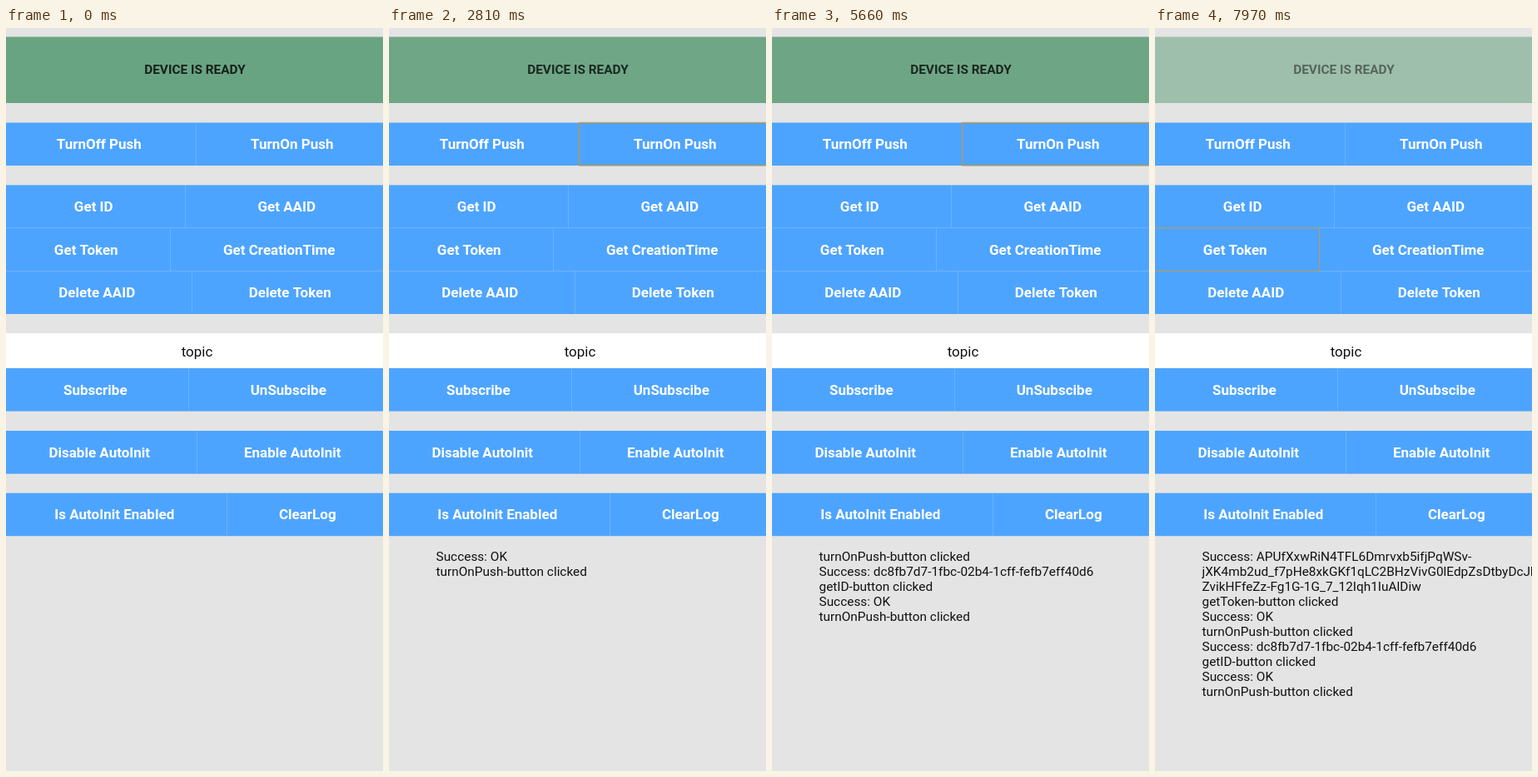
Write an HTML page with a canvas that moves like this. It is 453x891 px and loops after 8000 ms.

```html
<!DOCTYPE html>
<html lang="en">
<head>
<meta charset="utf-8">
<title>Push demo</title>
<style>
  html, body { margin: 0; width: 100%; height: 100%; overflow: hidden; background: #e4e4e4; }
  canvas { display: block; width: 453px; height: 891px; }
</style>
</head>
<body>
<canvas id="stage"></canvas>
<script>
const W = 453, H = 891, LOOP = 8000;
const LEFT = -5, RIGHT = 459;
const canvas = document.getElementById('stage');
const ctx = canvas.getContext('2d');
const ratio = window.devicePixelRatio || 1;
canvas.width = W * ratio;
canvas.height = H * ratio;
ctx.scale(ratio, ratio);

// Button rows: top, bottom, divider x, left label, right label
const rows = [
  [113.5, 165, 228.5, 'TurnOff Push', 'TurnOn Push'],
  [188.4, 240, 215.5, 'Get ID', 'Get AAID'],
  [240, 291.5, 197.5, 'Get Token', 'Get CreationTime'],
  [291.5, 343, 223.5, 'Delete AAID', 'Delete Token'],
  [408, 459.6, 219.5, 'Subscribe', 'UnSubscibe'],
  [483, 534.6, 229.5, 'Disable AutoInit', 'Enable AutoInit'],
  [557.7, 609.2, 265.5, 'Is AutoInit Enabled', 'ClearLog']
];

// Newest lines are shown on top
const log = [
  [850, 'turnOnPush-button clicked'],
  [2000, 'Success: OK'],
  [3600, 'getID-button clicked'],
  [3700, 'Success: dc8fb7d7-1fbc-02b4-1cff-fefb7eff40d6'],
  [5030, 'turnOnPush-button clicked'],
  [5950, 'Success: OK'],
  [6290, 'getToken-button clicked'],
  [7200, 'Success: APUfXxwRiN4TFL6Dmrvxb5ifjPqWSv-',
    'jXK4mb2ud_f7pHe8xkGKf1qLC2BHzVivG0lEdpZsDtbyDcJh',
    'ZvikHFfeZz-Fg1G-1G_7_12Iqh1IuAlDiw']
];

// Focus changes: time, row, side (0 left, 1 right)
const focus = [[800, 0, 1], [3560, 1, 0], [5030, 0, 1], [6230, 2, 0]];

const bezier = (a, b, s) => 3 * a * s * (1 - s) ** 2 + 3 * b * s * s * (1 - s) + s ** 3;

// CSS "ease" curve
function ease(x) {
  let lo = 0, hi = 1;
  for (let i = 0; i < 24; i++) {
    const mid = (lo + hi) / 2;
    if (bezier(0.25, 0.25, mid) < x) lo = mid; else hi = mid;
  }
  return bezier(0.1, 1, lo);
}

// Banner opacity: 0.4 -> 1 -> 0.4, each half eased
function blink(t) {
  const phase = ((t + 278) / 1421 % 1) * 2;
  return phase < 1 ? 0.4 + 0.6 * ease(phase) : 1 - 0.6 * ease(phase - 1);
}

function box(x, y, w, h, color) {
  ctx.fillStyle = color;
  ctx.fillRect(x, y, w, h);
}

function label(str, x, y, font, color, align = 'center') {
  ctx.font = font + ' Roboto, sans-serif';
  ctx.fillStyle = color;
  ctx.textAlign = align;
  ctx.fillText(str, x, y);
}

function drawBanner(t) {
  ctx.globalAlpha = blink(t);
  box(0, 10.6, W, 79.4, '#4b946a');
  label('DEVICE IS READY', 227, 55, 'bold 15.4px', '#000');
  ctx.globalAlpha = 1;
}

function drawRow([top, bottom, split, left, right]) {
  box(0, top, W, bottom - top, '#4da4ff');
  box(split - 0.5, top, 1, bottom - top, 'rgba(255,255,255,0.16)');
  const y = Math.round(top + 31.6);
  label(left, (LEFT + split) / 2, y, 'bold 17px', '#fff');
  label(right, (split + RIGHT) / 2, y, 'bold 17px', '#fff');
}

function drawFocus(t) {
  const active = focus.filter(f => f[0] <= t).pop();
  if (!active) return;
  const [top, bottom, split] = rows[active[1]];
  const x = active[2] ? split : LEFT;
  const w = active[2] ? RIGHT - split : split - LEFT;
  ctx.strokeStyle = active[2] ? 'rgba(215,145,20,0.72)' : 'rgba(205,145,30,0.6)';
  ctx.lineWidth = 1.4;
  ctx.strokeRect(x, top, w, bottom - top);
}

function drawLog(t) {
  const lines = log.filter(e => e[0] <= t).reverse().flatMap(e => e.slice(1));
  lines.forEach((line, i) => label(line, 56.5, 639 + 18 * i, '15.4px', '#111', 'left'));
}

function draw(t) {
  box(0, 0, W, H, '#e4e4e4');
  drawBanner(t);
  rows.forEach(drawRow);
  box(0, 239, W, 1, 'rgba(255,255,255,0.16)');
  box(0, 366, W, 41.5, '#fff');
  label('topic', 229.5, 393.5, '17px', '#111');
  drawFocus(t);
  drawLog(t);
}

const start = performance.now();
function tick() {
  draw((performance.now() - start) % LOOP);
  requestAnimationFrame(tick);
}
tick();
</script>
</body>
</html>
```
